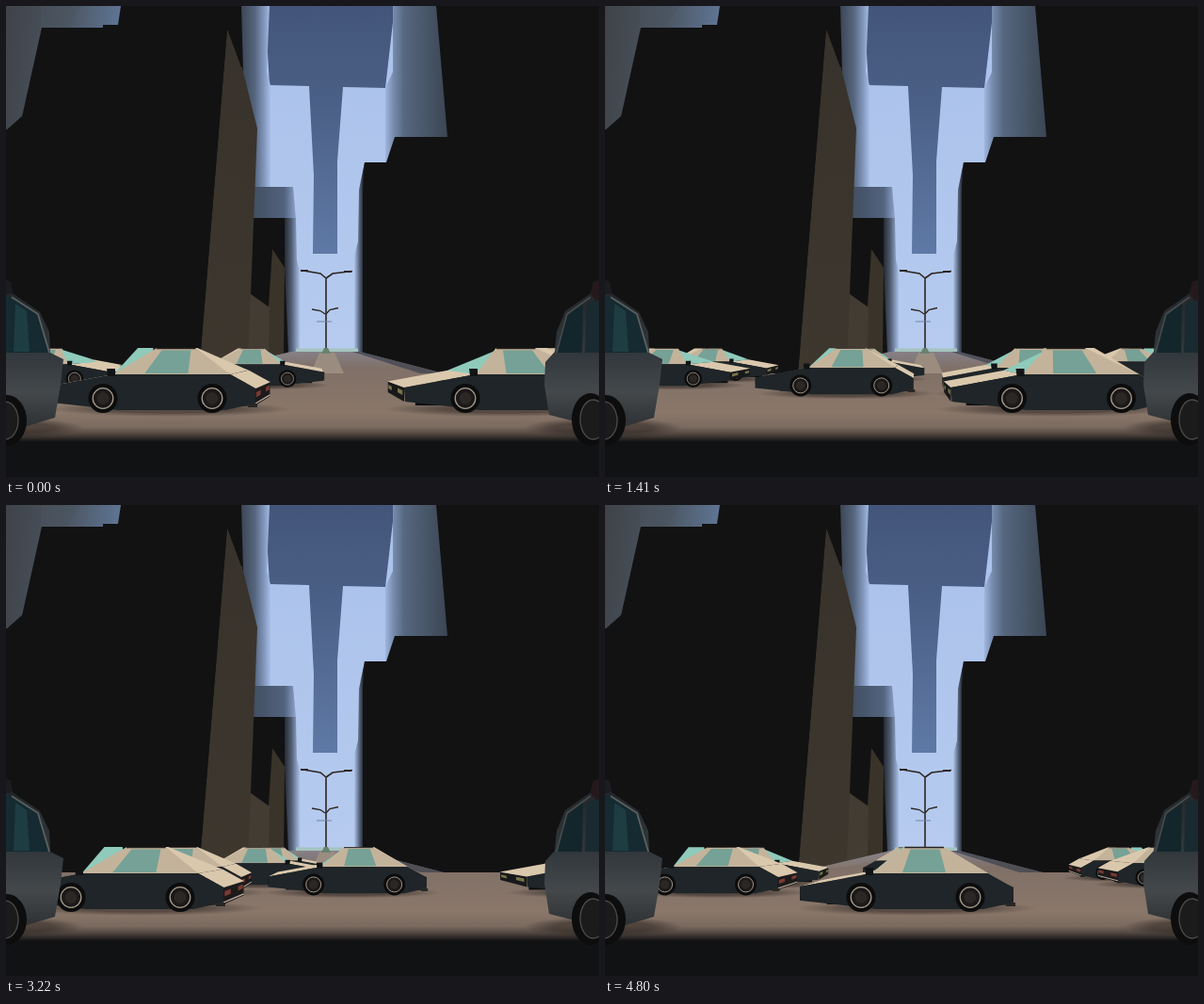
These frames come from a looping animation (630x500 px, 4850 ms). An HTML page without scripts:

```html
<!DOCTYPE html>
<html lang="en">
<head>
<meta charset="utf-8">
<title>City crossing</title>
<style>
@property --t { syntax: "<number>"; inherits: true; initial-value: 0; }
html, body { margin: 0; width: 100%; height: 100%; overflow: hidden; background: #111213; }
svg { display: block; width: 630px; height: 500px; }

/* --t is the clock in ms, advanced in held steps */
#traffic { animation: clock 4850ms infinite; }
@keyframes clock {
  0% { --t: 0; animation-timing-function: steps(1); }
  .618% { --t: 30; animation-timing-function: steps(12); }
  11.752% { --t: 570; animation-timing-function: steps(8); }
  19.175% { --t: 930; animation-timing-function: steps(4); }
  22.886% { --t: 1110; animation-timing-function: steps(6); }
  29.072% { --t: 1410; animation-timing-function: steps(5); }
  33.814% { --t: 1640; animation-timing-function: steps(12); }
  45.36% { --t: 2200; animation-timing-function: steps(5); }
  50.103% { --t: 2430; animation-timing-function: steps(7); }
  56.907% { --t: 2760; animation-timing-function: steps(10); }
  66.391% { --t: 3220; animation-timing-function: steps(2); }
  68.453% { --t: 3320; animation-timing-function: steps(11); }
  79.381% { --t: 3850; animation-timing-function: steps(5); }
  84.123% { --t: 4080; animation-timing-function: steps(7); }
  90.515% { --t: 4390; animation-timing-function: steps(9); }
  98.969% { --t: 4800; animation-timing-function: steps(1); }
  100% { --t: 4850; }
}

/* Offset of a car from the vanishing point, in lane units */
#traffic use { --c: calc(var(--x) - var(--t) * .75); }
/* Perspective: a point shifts by c / depth, and 1 / depth = a*x + b*y + d on each flat face.
   --q weakens the depth effect for distant lanes. */
.face {
  --a: 0; --b: 0; --d: 0;
  --cq: calc(var(--c) * var(--q));
  transform: matrix(calc(1 + var(--cq) * var(--a)), 0, calc(var(--cq) * var(--b)), 1,
    calc(var(--c) + var(--cq) * (var(--d) - 1)), 0);
}
.hood { --a: .01004; --b: .0545; }
.screen { --a: -.0769; --b: -.0969; }
.back { --a: .03226; --b: -.05496; }
.deck { --a: .0352; --b: -.0634; }
.tail { --a: .009615; }
.nose { --a: -.00813; }
.cabin { --b: .00204; --d: .945; }
.side { --d: 1; }
.under { --d: .93; }
</style>
</head>
<body>
<svg viewBox="0 0 630 500">
<defs>
  <linearGradient id="sky" x2="0" y2="1"><stop stop-color="#a9c0e9"/><stop offset="1" stop-color="#b6cbef"/></linearGradient>
  <linearGradient id="tower" x2="0" y2="1"><stop stop-color="#43557a"/><stop offset=".4" stop-color="#4b6086"/><stop offset="1" stop-color="#5f79a6"/></linearGradient>
  <linearGradient id="hazeL"><stop stop-color="#38414e"/><stop offset=".5" stop-color="#56667f"/><stop offset=".8" stop-color="#8398bd"/><stop offset="1" stop-color="#a9bfe8"/></linearGradient>
  <linearGradient id="hazeR"><stop stop-color="#a0b6de"/><stop offset=".13" stop-color="#768bad"/><stop offset=".3" stop-color="#56677f"/><stop offset="1" stop-color="#3a4552"/></linearGradient>
  <linearGradient id="block"><stop stop-color="#414d5f"/><stop offset=".75" stop-color="#52637e"/><stop offset="1" stop-color="#8da3ca"/></linearGradient>
  <linearGradient id="edgeL"><stop stop-color="#191c21"/><stop offset=".5" stop-color="#4e5b70"/><stop offset="1" stop-color="#aac0e7"/></linearGradient>
  <linearGradient id="edgeR"><stop stop-color="#aec4ea"/><stop offset=".5" stop-color="#56647c"/><stop offset="1" stop-color="#121213"/></linearGradient>
  <linearGradient id="corner" x2="1" y2=".1"><stop stop-color="#3f4349"/><stop offset=".5" stop-color="#4a535e"/><stop offset="1" stop-color="#5f7594"/></linearGradient>
  <linearGradient id="wall" x2="0" y2="1"><stop stop-color="#37322b"/><stop offset="1" stop-color="#3d372e"/></linearGradient>
  <linearGradient id="road" gradientUnits="userSpaceOnUse" x1="0" y1="364" x2="0" y2="468">
    <stop stop-color="#85828c"/><stop offset=".2" stop-color="#807067"/><stop offset=".65" stop-color="#8a776a"/>
    <stop offset=".8" stop-color="#7a6a5f"/><stop offset=".87" stop-color="#50453f"/><stop offset=".95" stop-color="#111213"/>
  </linearGradient>
  <linearGradient id="van" x2="0" y2="1"><stop stop-color="#1f2326"/><stop offset=".5" stop-color="#343a3e"/><stop offset=".7" stop-color="#44484b"/><stop offset="1" stop-color="#26292b"/></linearGradient>
  <radialGradient id="shadow"><stop offset=".5" stop-color="#2d2521" stop-opacity=".55"/><stop offset="1" stop-color="#2d2521" stop-opacity="0"/></radialGradient>

  <g id="wheel">
    <circle r="15.5" fill="#0c0c0d"/>
    <circle r="10.8" fill="#1b1919" stroke="#a59b8c" stroke-width="1.3"/>
    <circle r="6.5" fill="#2a2725"/>
  </g>

  <!-- Faces left; origin is midway between the wheels, on the horizon -->
  <g id="car">
    <ellipse class="face under" cy="64" rx="128" ry="8" fill="url(#shadow)"/>
    <path class="face under" d="M-95 46H88V60H-95Z" fill="#0e0f10"/>
    <g class="face nose">
      <path d="M-123 41L-103.3 34.4V46L-123 56Z" fill="#17191a"/>
      <path d="M-121 44L-115 41.5V46L-121 49ZM-108 40L-104 38V42L-108 44Z" fill="#77734a"/>
    </g>
    <g class="face tail">
      <path d="M104 42L87.4 35.3V50.4L104 60Z" fill="#1c1a1b"/>
      <path d="M103 46L98 43.4V48.4L103 51.5ZM92 41L88 38.6V43L92 45.5Z" fill="#7b3a33"/>
      <path d="M104 58L87.4 48.8" stroke="#b9ab98" stroke-width="1.4"/>
    </g>
    <path class="face hood" d="M-123 41L-47 27L-39.5 22.7L-103.3 34.4Z" fill="#dac8ad"/>
    <path class="face deck" d="M77 27L104 42L87.4 35.3L64.7 22.7Z" fill="#dac8ad"/>
    <path class="face screen" d="M-47 27L-12.3 -1H-11.3L-39.5 22.7Z" fill="#8fcabb"/>
    <path class="face back" d="M77 27L29.3 -1H26.9L64.7 22.7Z" fill="#dac8ad"/>
    <g class="face cabin">
      <path d="M-47 27L-12.3 -1H29.3L77 27Z" fill="#c4b39b"/>
      <path d="M-14 26L-6 1.5H25L32 26Z" fill="#76a196"/>
      <path d="M-12.3 -.5H29.3" stroke="#24211f" stroke-width="1.3"/>
    </g>
    <g class="face side">
      <path d="M-123 41L-47 27H77L104 42V60L90 61L72 65H-42L-76 61L-122 56Z" fill="#1f2528"/>
      <path d="M-54 21h9v8h-8z" fill="#111314"/>
      <path d="M96 58h10v4h-10z" fill="#282625"/>
      <use href="#wheel" x="-58" y="52.5"/>
      <use href="#wheel" x="58" y="52.5"/>
    </g>
  </g>
</defs>

<rect width="630" height="500" fill="#111213"/>
<rect x="250" width="170" height="370" fill="url(#sky)"/>
<path d="M275 0H413L403 87L358 86L352 165V263H326L327 180L322 85L280 84Z" fill="url(#tower)"/>

<!-- Left side of the street -->
<path d="M0 0H122V24L0 132Z" fill="url(#corner)"/>
<path d="M38 0H80L64 24H36Z" fill="#4a5461" opacity=".45"/>
<path d="M248 0H280L277 70L281 84V193H256Z" fill="url(#hazeL)"/>
<path d="M260 192H305L308 226H260Z" fill="url(#block)"/>
<path d="M294 225H308L309 270L312 280V368H294Z" fill="url(#edgeL)"/>
<path d="M256 225H296V278L300 369L256 380Z" fill="#121213"/>
<path d="M283 258L296 278L295 370L279 374V318Z" fill="#393329"/>
<path d="M256 303L280 320L279 374L252 382Z" fill="#423c33"/>
<path d="M235 24L252 70L267 130L257 380L205 390Z" fill="url(#wall)"/>
<path d="M0 131H14L38 23H103V20H119L122 0H250L252 70L235 24L205 390H0Z" fill="#121213"/>

<!-- Right side of the street -->
<path d="M411 0H460L470 140H413L404 167H403V87L411 70Z" fill="url(#hazeR)"/>
<path d="M457 0H630V391H465L376 368V200L381 166H404L413 139H469Z" fill="#121213"/>
<path d="M381 166L375 195L374 250L370 265V368H379V195Z" fill="url(#edgeR)"/>

<path d="M205 390L303 367H376L465 390H630V470H0V390Z" fill="url(#road)"/>
<path d="M205 390L303 367H322L262 383Z" fill="#8b8382" opacity=".4"/>
<path d="M376 367L465 390H440L368 367Z" fill="#3b414d" opacity=".7"/>
<path d="M333 368H349L359 390H324Z" fill="#9a8d80"/>
<path d="M308 363.5H374V367H308Z" fill="#a5c4c0"/>

<g fill="none" stroke="#2c2522">
  <path d="M340 366V289L334 284L313 280.5M340 289L347 284L368 281.5" stroke-width="1.6"/>
  <path d="M313 281h8M359 282h8" stroke-width="2.2"/>
  <path d="M339 327L334 323.5L325 322M340 327L344 322.5L353 320.5" stroke-width="1.3"/>
  <path d="M330 335H346" stroke="#7084a5" stroke-width="1"/>
</g>
<path d="M335 369L338 363H342L345 369Z" fill="#688270"/>

<!-- Four lanes, far to near; the two far ones are mirrored -->
<g id="traffic">
  <g transform="translate(340 364) scale(-.5 .5)" style="--q:.62">
    <use href="#car" style="--x:594"/><use href="#car" style="--x:1182"/><use href="#car" style="--x:1518"/>
    <use href="#car" style="--x:2520"/><use href="#car" style="--x:2760"/><use href="#car" style="--x:3164"/>
    <use href="#car" style="--x:3628"/>
  </g>
  <g transform="translate(340 364) scale(-.603 .603)" style="--q:.73">
    <use href="#car" style="--x:126"/><use href="#car" style="--x:501"/><use href="#car" style="--x:1524"/>
    <use href="#car" style="--x:1824"/><use href="#car" style="--x:2532"/><use href="#car" style="--x:3156"/>
    <use href="#car" style="--x:3910"/>
  </g>
  <g transform="translate(340 364) scale(.741)" style="--q:.88">
    <use href="#car" style="--x:305"/><use href="#car" style="--x:937"/><use href="#car" style="--x:1206"/>
    <use href="#car" style="--x:2189"/><use href="#car" style="--x:2455"/><use href="#car" style="--x:2826"/>
    <use href="#car" style="--x:3285"/>
  </g>
  <g transform="translate(340 364)" style="--q:1.12">
    <use href="#car" style="--x:-179"/><use href="#car" style="--x:206"/><use href="#car" style="--x:1208"/>
    <use href="#car" style="--x:1501"/><use href="#car" style="--x:2202"/><use href="#car" style="--x:2836"/>
    <use href="#car" style="--x:3590"/>
  </g>
</g>

<!-- Parked vans -->
<ellipse cx="20" cy="448" rx="62" ry="10" fill="url(#shadow)"/>
<path d="M0 291L5 293L7 305L36 325L46 346L47 368L61 375L58 402L52 437L22 446L0 460Z" fill="url(#van)"/>
<path d="M0 308L8 309L34 328L45 368H0Z" fill="#152a31"/>
<path d="M10 316L22 324L25 367H8Z" fill="#1e3d43"/>
<path d="M6 309L34 327L46 368" fill="none" stroke="#5d605f" stroke-width="1.8"/>
<path d="M0 291L5 293L7 305L0 306Z" fill="#1b1c1f"/>
<ellipse cx="1" cy="440" rx="21" ry="27" fill="#0d0d0e"/>
<ellipse cx="-1" cy="440" rx="14" ry="20" fill="#1c1b1c" stroke="#4c4b4b" stroke-width="1.3"/>

<ellipse cx="612" cy="448" rx="62" ry="10" fill="url(#shadow)"/>
<path d="M630 291L624 293L621 305L594 324L585 346L583 367L573 378L572 402L577 434L604 441L630 460Z" fill="url(#van)"/>
<path d="M613 316L596 329L585 368H612Z" fill="#13262c"/>
<path d="M621 309L596 327L585 368" fill="none" stroke="#474b4d" stroke-width="1.6"/>
<path d="M630 291L624 293L621 305L630 318Z" fill="#26191b"/>
<path d="M617 316L630 312V368H615Z" fill="#192a30"/>
<ellipse cx="621" cy="439" rx="20" ry="28" fill="#0d0d0e"/>
<ellipse cx="624" cy="439" rx="14" ry="21" fill="#1c1b1c" stroke="#4c4b4b" stroke-width="1.3"/>
</svg>
</body>
</html>
```
